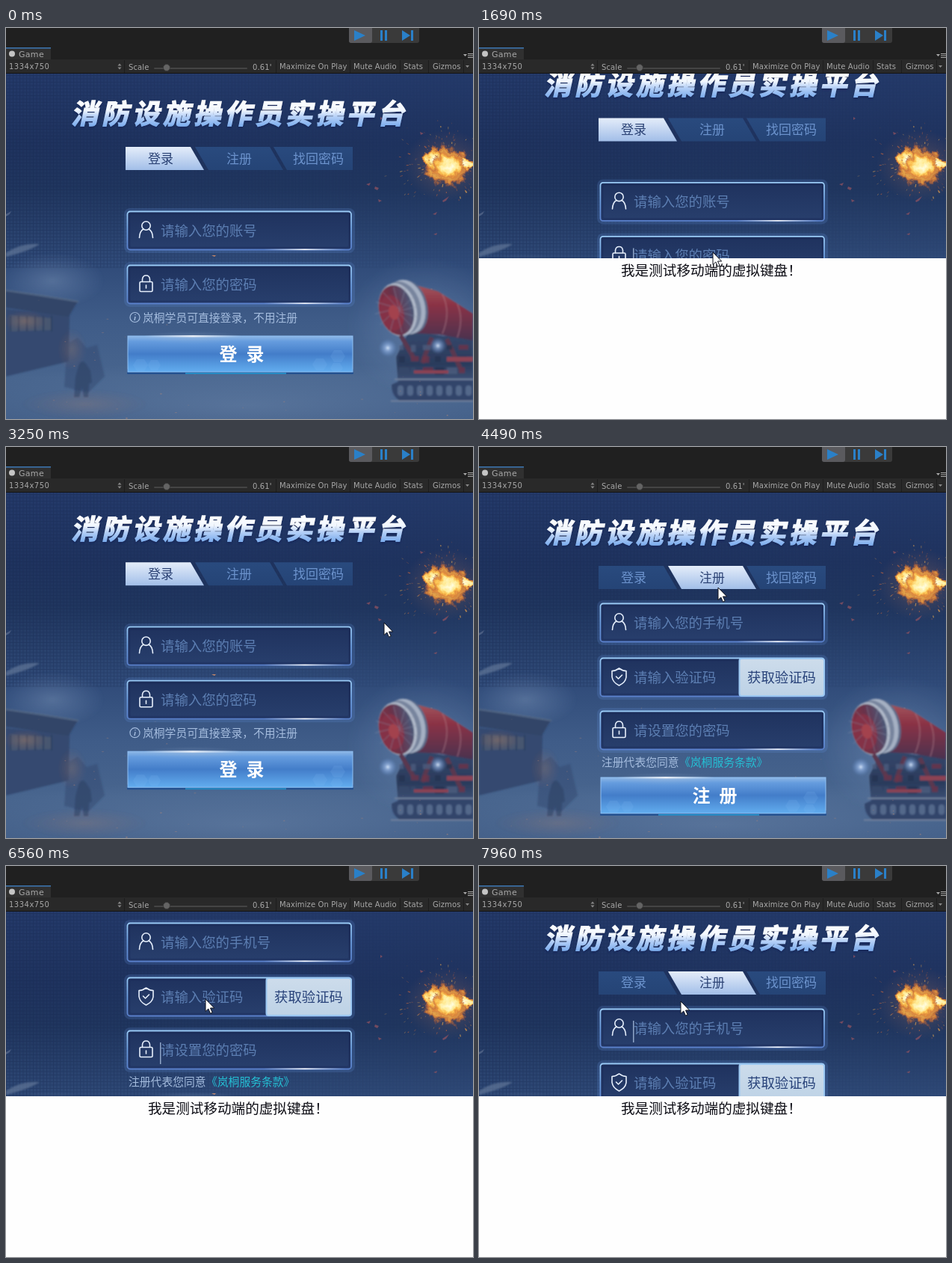
An HTML page for the animation above (8 s loop, 625 by 523 pixels).

```html
<!DOCTYPE html>
<html lang="zh-CN">
<head>
<meta charset="utf-8">
<title>登录</title>
<style>
html, body { margin: 0; width: 100%; height: 100%; overflow: hidden; background: #202020; }
svg { display: block; position: absolute; left: 0; top: 0; }
text { font-family: "Noto Sans CJK SC", "Noto Sans CJK", sans-serif; white-space: pre; }
.ui text { font: 10px "DejaVu Sans", sans-serif; letter-spacing: .1px; fill: #a8a8a8; }
.title { font-size: 36.5px; font-weight: 900; letter-spacing: 4.5px; fill: url(#titleFill); stroke: url(#titleFill); stroke-width: 1.3; }
.hint { font-size: 18.4px; fill: #5c7eb2; }
.note { font-size: 14.8px; fill: #a4bcde; }
.tab { font-size: 17px; text-anchor: middle; }
.icon { fill: none; stroke: #e6effc; stroke-width: 1.6; stroke-linecap: round; stroke-linejoin: round; }
</style>
</head>
<body>
<svg id="stage" width="625" height="523" viewBox="0 0 625 523" xmlns="http://www.w3.org/2000/svg"></svg>
<script>
const LOOP = 8000, STEP = 77.25;

let seed = 11;
const rnd = () => (seed = seed * 16807 % 2147483647) / 2147483647;
const between = (a, b) => a + (b - a) * rnd();
const many = (n, make) => Array.from({ length: n }, (_, i) => make(i)).join('');
const rect = (x, y, w, h, fill, more = '') => `<rect x="${x}" y="${y}" width="${w}" height="${h}" fill="${fill}" ${more}/>`;
const poly = (points, fill, more = '') => `<polygon points="${points}" fill="${fill}" ${more}/>`;
const path = (d, more = '') => `<path d="${d}" ${more}/>`;
const oval = (x, y, rx, ry, fill, more = '') => `<ellipse cx="${x}" cy="${y}" rx="${rx}" ry="${ry}" fill="${fill}" ${more}/>`;
const label = (x, y, s, more = '') => `<text x="${x}" y="${y}" ${more}>${s}</text>`;
const stops = list => list.map(([at, color, alpha = 1]) => `<stop offset="${at}" stop-color="${color}" stop-opacity="${alpha}"/>`).join('');
const down = (id, list) => `<linearGradient id="${id}" x2="0" y2="1">${stops(list)}</linearGradient>`;
const across = (id, list) => `<linearGradient id="${id}">${stops(list)}</linearGradient>`;
const radial = (id, list) => `<radialGradient id="${id}">${stops(list)}</radialGradient>`;

const defs = `<defs>
  ${down('sky', [[0, '#243a6a'], [.2, '#1f335f'], [.33, '#20365f'], [.55, '#304b79'], [.72, '#3f5c88'], [.88, '#48658e'], [1, '#425e87']])}
  ${down('titleFill', [[.15, '#fff'], [.45, '#f3f8ff'], [.62, '#b5d0f7'], [.85, '#7eaeee']])}
  ${down('tabOn', [[0, '#e4edfa'], [1, '#a2bee8']])}
  ${down('tabOff', [[0, '#294a7e'], [1, '#254476']])}
  ${down('box', [[0, '#1f325e'], [1, '#283f6d']])}
  ${down('edge', [[0, '#9bccf7'], [.5, '#6d9fe0'], [1, '#5a80cb']])}
  ${down('button', [[0, '#8fb8e6'], [.15, '#659cde'], [.5, '#437dc9'], [1, '#62adef']])}
  ${down('code', [[0, '#cddceb'], [1, '#bdd2e6']])}
  ${across('shine', [[0, '#dcecff', 0], [.5, '#fff'], [1, '#dcecff', 0]])}
  ${across('gridFade', [[0, '#fff'], [.45, '#fff', .45], [1, '#fff', .15]])}
  ${radial('blast', [[0, '#fffde0'], [.4, '#ffec98'], [.62, '#fbc050'], [.82, '#d97b35', .85], [1, '#8a4440', 0]])}
  ${radial('warm', [[0, '#c78a62', .32], [1, '#a86a55', 0]])}
  ${radial('mist', [[0, '#a0b8d8', .3], [1, '#8facd2', 0]])}
  ${radial('lamp', [[0, '#e8f2ff'], [.25, '#a6c4f0', .7], [1, '#6f9be0', 0]])}
  ${down('barrel', [[0, '#a2545c'], [.35, '#8b3345'], [1, '#4a3050']])}
  ${across('mouth', [[0, '#8c2f42'], [.45, '#6b3048'], [1, '#4a5878']])}
  ${down('chassis', [[0, '#35486c'], [.6, '#2b3b5c'], [1, '#42587e']])}
  <pattern id="grid" width="4.5" height="4.5" patternUnits="userSpaceOnUse"><path d="M0 .5H4.5M.5 0V4.5" stroke="#162850" opacity=".4"/></pattern>
  <mask id="gridMask">${rect(0, 61, 625, 260, 'url(#gridFade)')}</mask>
  <clipPath id="view">${rect(0, 61, 625, 462, '#fff')}</clipPath>
  <filter id="ragged" x="-40%" y="-40%" width="180%" height="180%">
    <feTurbulence type="fractalNoise" baseFrequency=".1" numOctaves="3" seed="4"/>
    <feDisplacementMap in="SourceGraphic" scale="17" xChannelSelector="R" yChannelSelector="G"/>
  </filter>
  <filter id="soft"><feGaussianBlur stdDeviation=".8"/></filter>
  <filter id="shade" x="-5%" y="-20%" width="110%" height="150%"><feDropShadow dx="0" dy="2" stdDeviation=".8" flood-color="#14285a"/></filter>
</defs>`;

const editor = () => `<g class="ui">
  ${rect(0, 0, 625, 61, '#202020')}
  ${rect(459, -4, 94, 24, '#3a3a3a', 'rx="3"')}${rect(459, -4, 31, 24, '#5a5a5e', 'rx="3"')}
  ${path('M490.500V19M521.500V19', 'stroke="#222"')}
  ${path('M466 3L481 10 466 17ZM501 3h3v14H501zM507 3h3v14H507zM530 3L541 10 530 17ZM542 3h3v14h-3z', 'fill="#2a80c8"')}
  ${rect(0, 27, 60, 16, '#303030')}${rect(0, 26, 60, 1.5, '#3c77b4')}
  <circle cx="8" cy="34.500" r="4" fill="#c4c4c4"/>
  ${label(17, 39, 'Game', 'style="font-size:11px;letter-spacing:.3px"')}
  ${path('M612 35h5l-2.500 3zM618 34h7v1h-7zM618 36.500h7v1h-7zM618 39h7v1h-7z', 'fill="#aaa"')}
  ${rect(0, 42, 625, 18, '#292929')}${rect(0, 60, 625, 1, '#131313')}
  ${[158, 361, 460, 527, 565, 612].map(x => rect(x, 43, 1, 17, '#1d1d1d')).join('')}
  ${label(4, 55, '1334x750', 'style="letter-spacing:.5px"')}
  ${path('M149.500 50.500l2.500-3 2.500 3zM149.500 52.500l2.500 3 2.500-3zM615 50h5l-2.500 3z', 'fill="#888"')}
  ${label(164, 56, 'Scale')}${rect(198, 53, 125, 2, '#454545', 'rx="1"')}
  <circle cx="215" cy="53" r="4.500" fill="#646464" stroke="#3a3a3a"/>
  ${label(330, 56, "0.61'")}${label(366, 55, 'Maximize On Play')}
  ${label(465, 55, 'Mute Audio')}${label(532, 55, 'Stats')}${label(571, 55, 'Gizmos')}
</g>`;

function spark() {
  const a = between(0, 6.283), r = between(26, 92) * between(.5, 1);
  const x = 592 + r * Math.cos(a), y = 182 + r * .8 * Math.sin(a), n = between(1, 4);
  return path(`M${x} ${y}l${n * Math.cos(a)} ${n * Math.sin(a)}`,
    `stroke="${rnd() < .4 ? '#e0a452' : '#a65c45'}" stroke-width="${between(.5, 1.3)}" opacity="${between(.3, .85)}"`);
}
const ember = () => oval(between(0, 625), 523 - 230 * rnd() * rnd(), between(.5, 1.8), between(.4, 1), '#b98b78',
  `opacity="${between(.15, .5)}"`);

const building = () => `<g filter="url(#soft)">
  ${oval(62, 338, 70, 38, 'url(#mist)')}
  ${poly('0,376 85,384 84,446 0,466', '#34496f')}
  ${poly('0,350 40,356 97,365 92,372 84,386 0,374', '#324567')}
  ${path('M0 351L40 357 97 366', 'fill="none" stroke="#536785" stroke-width="2"')}
  ${poly('4,384 62,388 62,404 4,406', '#475670')}
  ${many(6, i => rect(5 + i * 11, 385, 2, 21, '#2c3f62'))}
  ${oval(26, 392, 30, 14, 'url(#warm)')}
  ${poly('82,422 96,414 108,428 122,424 132,466 110,488 78,480', '#354c73', 'opacity=".55"')}
  ${path('M98 449q5-6 9 0l6 9 2 16-4 2-1 18h-6l-2-14-4 14h-7l2-28z', 'fill="#2c4167" opacity=".6"')}
  ${oval(88, 430, 20, 28, 'url(#warm)', 'opacity=".7"')}${oval(105, 503, 85, 20, 'url(#warm)', 'opacity=".6"')}
</g>`;

const cannon = () => `<g filter="url(#soft)">
  ${oval(560, 400, 105, 95, 'url(#mist)')}
  ${poly('540,404 585,412 625,412 625,480 525,480 522,440', 'url(#chassis)')}
  ${path('M548 344L578 352 625 382V418L580 410 545 408Z', 'fill="url(#barrel)"')}
  ${path('M584 356q12 24 0 53M604 369q9 20 0 45', 'fill="none" stroke="#b58390" stroke-width="1.500" opacity=".5"')}
  <g transform="rotate(-14 528 375)">
    ${oval(541, 376, 23, 36, '#5d6c8a')}${oval(536, 375, 25, 37, '#a5b0c3')}
    ${oval(530, 375, 25, 36, '#77849d')}${oval(524, 376, 25, 36, '#b0b9c9')}
    ${oval(522, 376, 23, 34, 'url(#mouth)')}${oval(516, 378, 15, 24, '#843046')}
    ${many(12, i => path('M526 376V345', `stroke="#8792a8" stroke-width=".8" opacity=".6" transform="rotate(${i * 30} 524 376)"`))}
    ${oval(518, 378, 7, 10, '#a3424e')}
  </g>
  ${path('M528 411L545 440M570 414L557 448M590 416L608 455', 'stroke="#5a3850" stroke-width="6"')}
  ${many(18, i => rect(526 + i % 6 * 16, 424 + Math.floor(i / 6) * 15, between(6, 14), between(4, 10),
    ['#6f3449', '#4b5d7e', '#24344f', '#37496b'][Math.floor(rnd() * 4)], 'opacity=".8"'))}
  ${path('M590 440h35v6h-35zM546 458h46v4h-46z', 'fill="#8c4253"')}
  ${path('M516 477L534 469H625V500H530Q516 494 516 477Z', 'fill="#33456a"')}
  ${many(8, i => rect(524 + i * 13, 478, 8, 14, '#53678a', 'rx="4"'))}
  ${path('M520 470H625M515 499H625', 'stroke="#70809c" stroke-width="2"')}
  ${oval(511, 428, 12, 12, 'url(#lamp)')}${oval(578, 425, 11, 11, 'url(#lamp)')}
</g>`;

const scene = () => `
  ${rect(0, 61, 625, 462, 'url(#sky)')}
  ${rect(0, 61, 625, 260, 'url(#grid)', 'mask="url(#gridMask)"')}
  ${oval(320, 505, 400, 60, 'url(#mist)', 'opacity=".7"')}
  ${path('M0 301Q20 287 45 289 32 298 0 306Z', 'fill="#6a7f9f" opacity=".6" filter="url(#soft)"')}
  ${path('M0 249l7-4-2 4-5 3z', 'fill="#71819f" opacity=".5"')}
  ${building()}${cannon()}
  ${oval(590, 184, 58, 48, 'url(#warm)')}
  <g filter="url(#ragged)">${oval(591, 185, 32, 27, 'url(#blast)')}${oval(616, 182, 22, 8, 'url(#blast)')}${oval(572, 175, 15, 17, 'url(#blast)')}${oval(592, 185, 23, 19, 'url(#blast)')}</g>
  ${many(150, spark)}
  ${path('M482 209l6-2-2 4zM494 212l5 2-2 3-4-2zM498 229l5 2-4 2zM584 231l9-6-4 6-4 2zM571 249l6-3-2 4zM554 139l5 2-4 2zM501 119l3 2-3 2zM572 276l5-2-1 3z', 'fill="#8e5260" opacity=".75"')}
  ${path('M275 304l6 0-2 2z', 'fill="#c08468"')}
  ${many(40, ember)}`;

const TABS = [
  ['160,159 247,159 265,190 160,190', 207, '登录'],
  ['253,159 353,159 371,190 271,190', 312, '注册'],
  ['358,159 464,159 464,190 376,190', 418, '找回密码']
];
const tabs = active => TABS.map(([shape, x, name], i) => {
  const on = i === active;
  return poly(shape, `url(#${on ? 'tabOn' : 'tabOff'})`) +
    label(x, 180.500, name, `class="tab" fill="${on ? '#2b4274' : '#6c93cd'}" font-weight="${on ? 500 : 400}"`);
}).join('');

// Icons are drawn around the row's centre line.
const ICONS = {
  user: '<circle cx="187.500" cy="-6.500" r="5.700"/><path d="M178.500 9.500Q179 .5 184 -2M191 -2Q196 .5 196.500 9.500"/>',
  lock: '<rect x="179" y="-3.500" width="17" height="13" rx="1.500"/><path d="M182.500-4V-7Q183-12 187.500-12T192.500-7V-4M187.500 1V5"/>',
  shield: '<path d="M187.500-12Q192-8.500 197-8.500V0Q196 7 187.500 11 179 7 178-.5V-8.500Q183-8.500 187.500-12ZM183.500-1l3 3 5-5"/>'
};
const field = (cy, icon, hint, extra = '') => `<g transform="translate(0 ${cy})">
  ${rect(160, -28, 305, 56, 'none', 'rx="6" stroke="#6a9be8" stroke-width="4" opacity=".18"')}
  ${rect(162.5, -25.5, 299.5, 51, 'url(#box)', 'rx="3.500" stroke="url(#edge)" stroke-width="1.800"')}
  ${rect(165, -23, 294.5, 46, 'none', 'rx="3" stroke="#142450" stroke-width="3" opacity=".3"')}
  ${rect(345, 24.5, 110, 1.6, 'url(#shine)')}
  <g class="icon">${ICONS[icon]}</g>${label(207, 7, hint, 'class="hint"')}${extra}</g>`;
const submit = (cy, name) => `<g transform="translate(0 ${cy})">
  ${rect(162, 20, 303, 7, '#23508f', 'rx="1"')}
  ${rect(163, -24, 301, 48, 'url(#button)', 'stroke="#8fc0f4" stroke-width="1"')}
  ${path('M170 15l5-8h10l5 8-5 8h-10zM190 15l4-7h9l4 7-4 7h-9zM410 14l5-8h10l5 8-5 8h-10zM434 3l5-8h10l5 8-5 8h-10zM434 19l4-7h9l4 7-4 5h-9z', 'fill="#8cc0f5" opacity=".13"')}
  ${rect(185, -25, 130, 2.5, 'url(#shine)')}${oval(250, -22, 70, 9, 'url(#mist)')}
  ${rect(240, 25, 135, 2, '#27a3dc', 'opacity=".7"')}
  ${label(285.5, 9, name, 'fill="#fff" font-size="24" font-weight="700" style="letter-spacing:12px"')}</g>`;

const codeButton = rect(348.5, -25, 113.5, 50, 'url(#code)', 'rx="3" stroke="#9cc8f2" stroke-width="2"') +
  label(359, 7, '获取验证码', 'font-size="18.4" fill="#29437a"');
const login = () => tabs(0) + field(271, 'user', '请输入您的账号') + field(343, 'lock', '请输入您的密码') +
  '<circle cx="172.500" cy="387" r="6.500" fill="none" stroke="#a4bcde" stroke-width="1.200"/>' +
  path('M173 383v1M173 386l-1 5', 'stroke="#a4bcde" stroke-width="1.500"') +
  label(183, 392.5, '岚桐学员可直接登录，不用注册', 'class="note"') + submit(436, '登录');
const register = () => tabs(1) + field(235, 'user', '请输入您的手机号') + field(308, 'shield', '请输入验证码', codeButton) +
  field(379, 'lock', '请设置您的密码') + label(164, 426.5, '注册代表您同意', 'class="note"') +
  label(268, 426.5, '《岚桐服务条款》', 'class="note" style="fill:#25bfd4"') + submit(466, '注册');

const stage = document.getElementById('stage');
stage.innerHTML = `${defs}${editor()}
<g clip-path="url(#view)">${scene()}
  <g id="form">
    <g filter="url(#shade)"><text class="title" transform="translate(87 128) skewX(-12)">消防设施操作员实操平台</text></g>
    <g id="login">${login()}</g><g id="register">${register()}</g>
    ${rect(206, -10, 1.5, 29, '#8fa5c8', 'id="caret"')}
  </g>
  <g id="keyboard">${rect(0, 308, 625, 215, '#fefefe')}${label(190, 331, '我是测试移动端的虚拟键盘！', 'font-size="18.6" fill="#0c0c14"')}</g>
</g>
<path id="cursor" d="M0 0V16.500L3.800 13 6.500 19.200 9.200 18 6.500 12H11.700Z" fill="#fff" stroke="#10131c"/>`;

const [form, loginPage, registerPage, caret, keyboard, cursor] =
  ['form', 'login', 'register', 'caret', 'keyboard', 'cursor'].map(id => document.getElementById(id));

// start, duration, vertical offset reached
const SLIDES = [[689, 480, -25], [1650, 500, -97], [2980, 340, 0], [5353, 500, -133], [6760, 500, -62], [7772, 500, 11]];
// start, end, centre line of the focused field
const FOCUS = [[590, 1565, 271], [1565, 2980, 343], [5265, 6812, 379], [6812, 7720, 308], [7720, 8100, 235]];
// time, x, y
const POINTER = [[70, 400, 523], [580, 315, 272], [910, 315, 272], [1150, 313, 295], [1300, 313, 296], [1460, 313, 300],
  [1860, 313, 300], [2150, 274, 293], [2250, 274, 293], [2470, 475, 243], [2640, 475, 243], [2840, 506, 235],
  [3800, 506, 235], [4250, 320, 188], [4570, 320, 188], [5180, 273, 377], [5850, 273, 377], [6330, 267, 180],
  [6560, 267, 178], [7340, 267, 178], [7560, 269, 180], [7730, 270, 181], [8100, 270, 181]];

const smooth = u => u * u * (3 - 2 * u);
function offsetAt(t) {
  let y = 0;
  for (const [start, span, goal] of SLIDES) {
    const u = Math.min(1, Math.max(0, (t - start) / span));
    y += (goal - y) * u * (2 - u);
  }
  return y;
}
function pointerAt(t) {
  const i = POINTER.findIndex(p => p[0] > t);
  if (i < 1) return null;
  const [t0, x0, y0] = POINTER[i - 1], [t1, x1, y1] = POINTER[i];
  const u = smooth((t - t0) / (t1 - t0));
  return [x0 + (x1 - x0) * u, y0 + (y1 - y0) * u];
}
const show = (node, on) => node.setAttribute('visibility', on ? 'visible' : 'hidden');

function draw(now) {
  const t = Math.floor((now % LOOP + 15) / STEP) * STEP;
  form.setAttribute('transform', `translate(0 ${offsetAt(t).toFixed(2)})`);
  show(loginPage, t < 4330);
  show(registerPage, t >= 4330);
  show(keyboard, (t >= 680 && t < 2980) || t >= 5345);

  const focus = FOCUS.find(([start, end]) => t >= start && t < end);
  show(caret, focus && (t - focus[0]) % 1176 < 588);
  if (focus) caret.setAttribute('transform', `translate(0 ${focus[2]})`);

  const at = pointerAt(t);
  show(cursor, at);
  if (at) cursor.setAttribute('transform', `translate(${at[0].toFixed(1)} ${at[1].toFixed(1)})`);
}

const begin = performance.now();
function tick() {
  draw(performance.now() - begin);
  requestAnimationFrame(tick);
}
tick();
</script>
</body>
</html>
```
